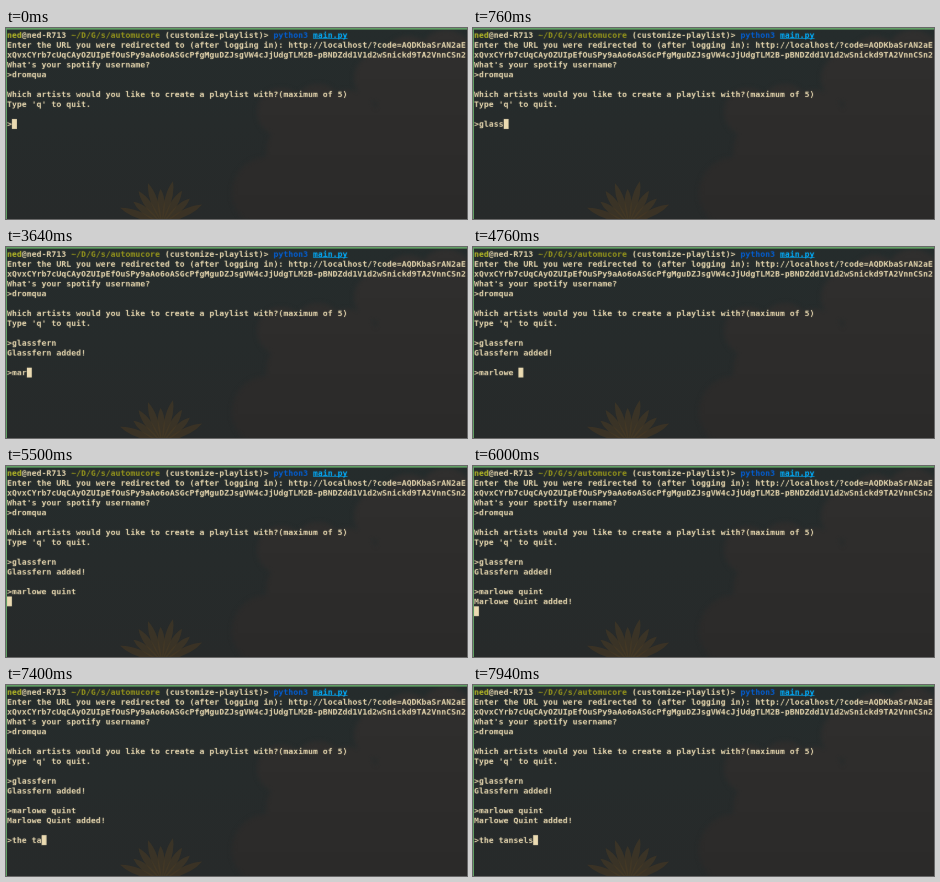
An HTML page with a canvas that plays this animation: 461x191 px, repeating every 8000 ms.

```html
<!DOCTYPE html>
<html lang="en">
<head>
<meta charset="utf-8">
<title>Terminal</title>
<style>
html, body { margin: 0; width: 100%; height: 100%; overflow: hidden; background: #262b2b; }
canvas { display: block; width: 461px; height: 191px; }
</style>
</head>
<body>
<canvas id="stage" width="461" height="191"></canvas>
<script>
const W = 461, H = 191, LOOP = 8000;
const SCALE = W / 841, CELL_W = 9, CELL_H = 18, ASCENT = 14, LEFT = 2, TOP = 4;
const FG = '#ebdbb2';

const view = document.getElementById('stage').getContext('2d');
view.imageSmoothingQuality = 'high';

// The terminal is drawn at its full size and then scaled down.
const screen = document.createElement('canvas');
screen.width = Math.ceil(W / SCALE);
screen.height = Math.ceil(H / SCALE);
const ctx = screen.getContext('2d');

const wallpaper = document.createElement('canvas');
wallpaper.width = W;
wallpaper.height = H;
paintWallpaper(wallpaper.getContext('2d'));

function shade(g, from, to) {
  const fill = g.createLinearGradient(0, 0, 0, H);
  fill.addColorStop(0, from);
  fill.addColorStop(1, to);
  return fill;
}

function paintWallpaper(g) {
  g.fillStyle = shade(g, '#252c2c', '#272a2a');
  g.fillRect(0, 0, W, H);

  // cloud: overlapping puffs filled as one shape
  const puffs = [
    [275, 84, 24], [312, 80, 24], [342, 92, 30], [372, 50, 24], [402, 34, 26],
    [440, 30, 28], [425, 85, 55], [300, 125, 40], [370, 135, 55], [450, 150, 60],
    [262, 165, 36], [320, 175, 45], [400, 185, 50]
  ];
  g.filter = 'blur(2px)';
  g.fillStyle = shade(g, '#302f2e', '#2b2a29');
  g.beginPath();
  for (const [x, y, r] of puffs) {
    g.moveTo(x + r, y);
    g.arc(x, y, r, 0, Math.PI * 2);
  }
  g.fill();

  // petals rising from the lower edge
  g.filter = 'blur(0.7px)';
  g.fillStyle = 'rgba(72,58,36,0.6)';
  for (let i = 0; i < 9; i++) {
    const length = 40 + 5 * Math.cos(i * 2.4);
    g.save();
    g.translate(156, 196);
    g.rotate(-1.2 + i * 0.29);
    g.beginPath();
    g.moveTo(0, 0);
    g.quadraticCurveTo(-7, -length * 0.65, 0, -length);
    g.quadraticCurveTo(7, -length * 0.65, 0, 0);
    g.fill();
    g.restore();
  }
  g.filter = 'none';
}

function put(text, row, col = 0, color = FG, underline = false) {
  const x = LEFT + col * CELL_W;
  const y = TOP + row * CELL_H + ASCENT;
  ctx.fillStyle = color;
  [...text].forEach((ch, i) => ctx.fillText(ch, x + i * CELL_W, y));
  if (underline) ctx.fillRect(x, y + 1, text.length * CELL_W, 1);
}

function putRuns(row, runs) {
  let col = 0;
  for (const [text, color, underline] of runs) {
    put(text, row, col, color, underline);
    col += text.length;
  }
}

function cursor(row, col) {
  ctx.fillStyle = FG;
  ctx.fillRect(LEFT + col * CELL_W, TOP + row * CELL_H, CELL_W, CELL_H);
}

const PROMPT = [
  ['ned', '#b8bb26'],
  ['@ned-R713 ', FG],
  ['~/D/G/s/automucore', '#98971a'],
  [' (customize-playlist)> ', FG],
  ['python3', '#005fd7'],
  [' ', FG],
  ['main.py', '#00afff', true]
];

const HEADER = [
  'Enter the URL you were redirected to (after logging in): http://localhost/?code=AQDKbaSrAN2aE',
  'xQvxCYrb7cUqCAyOZUIpEfOuSPy9aAo6oASGcPfgMguDZJsgVW4cJjUdgTLM2B-pBNDZdd1V1d2wSnickd9TA2VnnCSn2',
  "What's your spotify username?",
  '>dromqua',
  '',
  'Which artists would you like to create a playlist with?(maximum of 5)',
  "Type 'q' to quit."
];

// keys: [time, number of characters typed so far]
const ENTRIES = [
  { row: 9, start: 0, enter: 2640, reply: 2640, text: 'glassfern', answer: 'Glassfern added!',
    keys: [[360, 1], [380, 2], [580, 3], [720, 4], [760, 5], [2640, 9]] },
  { row: 12, start: 2640, enter: 5500, reply: 6000, text: 'marlowe quint', answer: 'Marlowe Quint added!',
    keys: [[3300, 1], [3400, 2], [3640, 3], [3860, 5], [3960, 6], [4180, 7], [4320, 9],
           [4760, 8], [4900, 10], [5040, 11], [5240, 13]] },
  { row: 15, start: 6340, enter: Infinity, reply: Infinity, text: 'the tansels', answer: '',
    keys: [[6980, 1], [7120, 3], [7260, 5], [7400, 6], [7540, 8], [7660, 9], [7800, 10], [7940, 11]] }
];

function typed(keys, t) {
  let n = 0;
  for (const [at, count] of keys) if (t >= at) n = count;
  return n;
}

function draw(t) {
  ctx.clearRect(0, 0, screen.width, screen.height);
  ctx.font = 'bold 14.67px "DejaVu Sans Mono", monospace';
  putRuns(0, PROMPT);
  HEADER.forEach((line, i) => put(line, i + 1));

  let spot = [9, 1];
  for (const { row, start, enter, reply, text, answer, keys } of ENTRIES) {
    if (t < start) break;
    const n = typed(keys, t);
    put('>' + text.slice(0, n), row);
    spot = [row, n + 1];
    if (t >= enter) spot = [row + 1, 0];
    if (t >= reply) {
      put(answer, row + 1);
      spot = [row + 2, 0];
    }
  }
  cursor(...spot);

  view.drawImage(wallpaper, 0, 0);
  view.drawImage(screen, 0, 0, screen.width * SCALE, screen.height * SCALE);
  view.fillStyle = '#62a065';
  view.fillRect(0, 0, W, 3 * SCALE);
  view.fillRect(0, 0, 1, H);
}

const began = performance.now();
function tick() {
  draw((performance.now() - began) % LOOP);
  requestAnimationFrame(tick);
}
tick();
</script>
</body>
</html>
```
